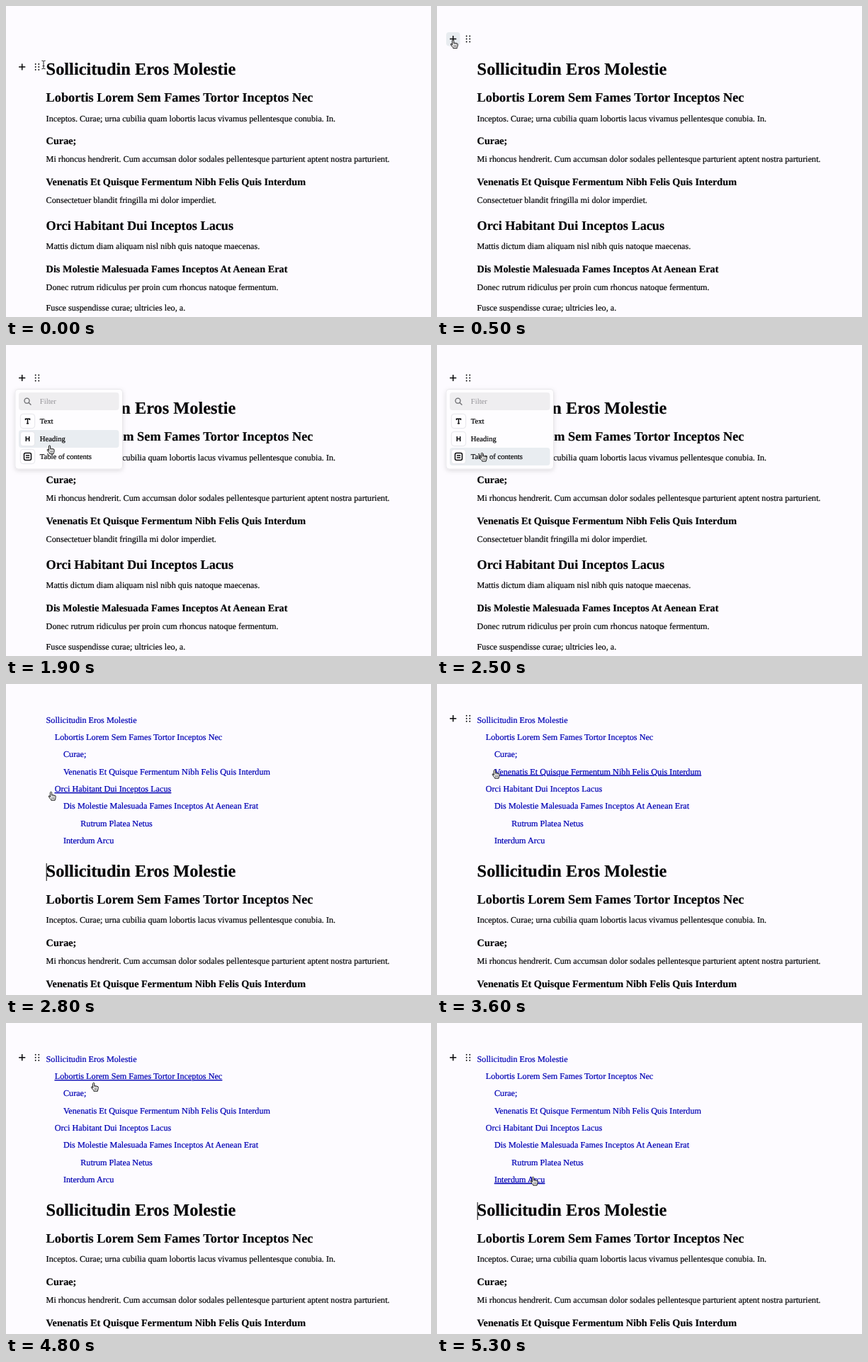
An HTML page for the animation above (5400 ms loop, 600 by 439 pixels).

```html
<!DOCTYPE html>
<html lang="en">
<head>
<meta charset="utf-8">
<title>Block editor</title>
<style>
  html, body { margin: 0; width: 100%; height: 100%; overflow: hidden; background: #fdfbff; }
  svg { display: block; width: 600px; height: 439px; }
  text {
    font-family: "Liberation Serif", Times, serif; text-rendering: geometricPrecision; white-space: pre;
    stroke: #08080a; stroke-width: .22px; text-decoration-thickness: .75px;
  }
  .h1, .h2, .h3 { font-weight: bold; }
  .h1 { font-size: 24.38px; }
  .h2 { font-size: 18.28px; }
  .h3 { font-size: 14.25px; }
  .p, .link { font-size: 12.19px; }
  .link { fill: #0000b4; stroke: #0000b4; }
  .item { font-size: 10.65px; }
  .hint { stroke: none; }
</style>
</head>
<body>
<svg id="stage" viewBox="0 0 600 439" fill="#08080a">
  <defs>
    <filter id="soft" x="-20%" y="-20%" width="140%" height="150%">
      <feDropShadow dx="0" dy="2" stdDeviation="3" flood-color="#000" flood-opacity=".13"/>
    </filter>
  </defs>
  <g id="doc"></g>
  <g id="toc"></g>
  <rect id="caret" x="56.7" y="253" width="1" height="25"/>
  <g id="tools">
    <rect id="glow" x="-9.7" y="-9.5" width="19.5" height="19.5" rx="4" fill="#e8ecf0"/>
    <path d="M-4.6 0H4.6M0-4.6V4.6" stroke="#08080a" stroke-width="1.5" fill="none"/>
    <g id="grip"></g>
  </g>
  <g id="menu">
    <rect x="13" y="62.5" width="151.5" height="112.5" rx="4" fill="#fefdff" stroke="#e6e5e9" stroke-width=".8" filter="url(#soft)"/>
    <rect x="18" y="67" width="141.5" height="25" rx="4" fill="#efeef0"/>
    <g fill="none" stroke="#68686c" stroke-width="1.3" stroke-linecap="round">
      <circle cx="29.5" cy="78.7" r="3.5"/><path d="M32.2 81.4L35 84.2"/>
    </g>
    <text class="item hint" x="47.8" y="82.8" fill="#939297">Filter</text>
    <rect id="mark" x="18" width="141.5" height="25" rx="4" fill="#e9edf1"/>
    <g id="items"></g>
  </g>
  <g id="hand" stroke-linejoin="round" stroke-linecap="round">
    <g transform="translate(.6 .3) scale(.86)">
      <path fill="#fff" stroke="#111" stroke-width="1.15" d="M-1.4 8.2V1.4a1.3 1.3 0 0 1 2.6 0V5.2q1.2-.9 2.2.3q1.2-.8 2.1.4q1.6-.5 2 1v2.6q0 1.6-1 3v1.3h-6.4v-1.1q-1.8-1.6-3.8-4.6q-.8-1.6.7-1.7q.8.1 1.6 1.8z"/>
      <path fill="none" stroke="#111" stroke-width=".7" d="M1.2 5.2V7M3.4 5.5V7M5.5 5.9V7.2M1.3 9v2.6M3.2 9v2.6M5.1 9v2.6"/>
    </g>
  </g>
  <path id="beam" fill="none" stroke="#222" stroke-width="1" d="M-2.6-5.8Q-.3-5.8 0-4.8Q.3-5.8 2.6-5.8M0-4.8V4.8M-2.6 5.8Q-.3 5.8 0 4.8Q.3 5.8 2.6 5.8M-1.4 1.6H1.4"/>
</svg>
<script>
const LOOP = 5400, STEP = 100, ROW = 24.3, LEFT = 56.6;
const $ = id => document.getElementById(id);

function add(parent, tag, attrs, text) {
  const el = document.createElementNS("http://www.w3.org/2000/svg", tag);
  for (const k in attrs) el.setAttribute(k, attrs[k]);
  if (text) el.textContent = text;
  parent.appendChild(el);
  return el;
}

const blocks = [
  ["h1", 97, "Sollicitudin Eros Molestie"],
  ["h2", 135.2, "Lobortis Lorem Sem Fames Tortor Inceptos Nec"],
  ["p", 162.5, "Inceptos. Curae; urna cubilia quam lobortis lacus vivamus pellentesque conubia. In."],
  ["h3", 195.1, "Curae;"],
  ["p", 220.3, "Mi rhoncus hendrerit. Cum accumsan dolor sodales pellentesque parturient aptent nostra parturient."],
  ["h3", 253, "Venenatis Et Quisque Fermentum Nibh Felis Quis Interdum"],
  ["p", 278.1, "Consectetuer blandit fringilla mi dolor imperdiet."],
  ["h2", 316, "Orci Habitant Dui Inceptos Lacus"],
  ["p", 342.6, "Mattis dictum diam aliquam nisl nibh quis natoque maecenas."],
  ["h3", 375.9, "Dis Molestie Malesuada Fames Inceptos At Aenean Erat"],
  ["p", 401.2, "Donec rutrum ridiculus per proin cum rhoncus natoque fermentum."],
  ["p", 430.2, "Fusce suspendisse curae; ultricies leo, a."]
];
for (const [kind, y, text] of blocks) add($("doc"), "text", { class: kind, x: LEFT, y }, text);

const heads = blocks.filter(b => b[0] !== "p").map(b => [b[0][1] - 1, b[2]]);
heads.push([4, "Rutrum Platea Netus"], [2, "Interdum Arcu"]);
const links = heads.map(([depth, text], i) =>
  add($("toc"), "text", { class: "link", x: LEFT + depth * 12.16, y: 54.8 + i * ROW }, text));

for (let i = 0; i < 6; i++)
  add($("grip"), "circle", { cx: 19 + (i % 2) * 4.6, cy: (i >> 1) * 4 - 4, r: 0.95 });

const icons = [
  "M-3-1.6V-3.2H3V-1.6M0-3.2V3.2M-1.5 3.3H1.5",
  "M-2.2-3.6V3.6M2.2-3.6V3.6M-2.2 0H2.2",
  "M-3-5H3Q5-5 5-3V3Q5 5 3 5H-3Q-5 5-5 3V-3Q-5-5-3-5ZM-2.6-1.4H2.6M-2.6 1.6H2.6"
];
["Text", "Heading", "Table of contents"].forEach((label, i) => {
  const y = 107.5 + i * 25, g = $("items");
  add(g, "rect", { x: 20.3, y: y - 10.2, width: 20.4, height: 20.4, rx: 4, fill: "#fefdff", stroke: "#e3e2e7", "stroke-width": 0.9 });
  add(g, "path", { d: icons[i], transform: `translate(30.5 ${y})`, fill: "none", stroke: "#08080a", "stroke-width": 1.5 });
  add(g, "text", { class: "item", x: 47.8, y: y + 3.4 }, label);
});

// pointer path: time, x, y
const path = [
  [0, 53, 83], [200, 67, 77], [400, 42, 57], [500, 22.1, 47.5], [1300, 22.1, 47.5],
  [1500, 36, 72], [1700, 55, 112], [1900, 61, 141.5], [2200, 62, 82], [2500, 63, 152],
  [3100, 63, 152], [3450, 75, 60], [3800, 90, 215], [4250, 102, 56], [4400, 101, 59.5],
  [4600, 118, 130], [4900, 125, 68], [5100, 130, 128], [5300, 135, 217]
];

function pointer(t) {
  const i = path.findIndex(k => k[0] > t);
  if (i < 0) return path[path.length - 1].slice(1);
  const a = path[i - 1], b = path[i];
  const p = (t - a[0]) / (b[0] - a[0]), s = p * p * (3 - 2 * p);
  return [a[1] + (b[1] - a[1]) * s, a[2] + (b[2] - a[2]) * s];
}

const show = (id, on) => $(id).setAttribute("display", on ? "inline" : "none");
const move = (id, x, y) => $(id).setAttribute("transform", `translate(${x} ${y})`);

function draw(t) {
  const [x, y] = pointer(t);
  const listed = t >= 2700, open = t >= 700 && !listed;

  move("doc", 0, listed ? 174.9 : 0);
  show("toc", listed);
  show("caret", listed && Math.floor((t - 2700) / 530) % 2 === 0);
  const row = Math.floor((y - 39) / ROW);
  links.forEach((el, i) => { el.style.textDecorationLine = listed && i === row ? "underline" : "none"; });

  show("tools", !listed || t >= 3200);
  move("tools", 22.7, listed ? 48.7 : y > 68 && t < 600 ? 86 : 46.5);
  show("glow", !listed && x > 13 && x < 33 && y > 37 && y < 57);

  show("menu", open);
  $("menu").setAttribute("opacity", Math.min(1, (t - 600) / 300));
  const item = Math.floor((y - 95) / 25);
  show("mark", open && item >= 0);
  $("mark").setAttribute("y", 95 + item * 25);

  const typing = open ? y > 67 && y < 92 : !listed && x > 50;
  show("beam", typing);
  show("hand", !typing);
  move(typing ? "beam" : "hand", x, y);
}

function tick() {
  const t = performance.now() % LOOP;
  draw(Math.floor(t / STEP) * STEP);
  requestAnimationFrame(tick);
}
tick();
</script>
</body>
</html>
```
